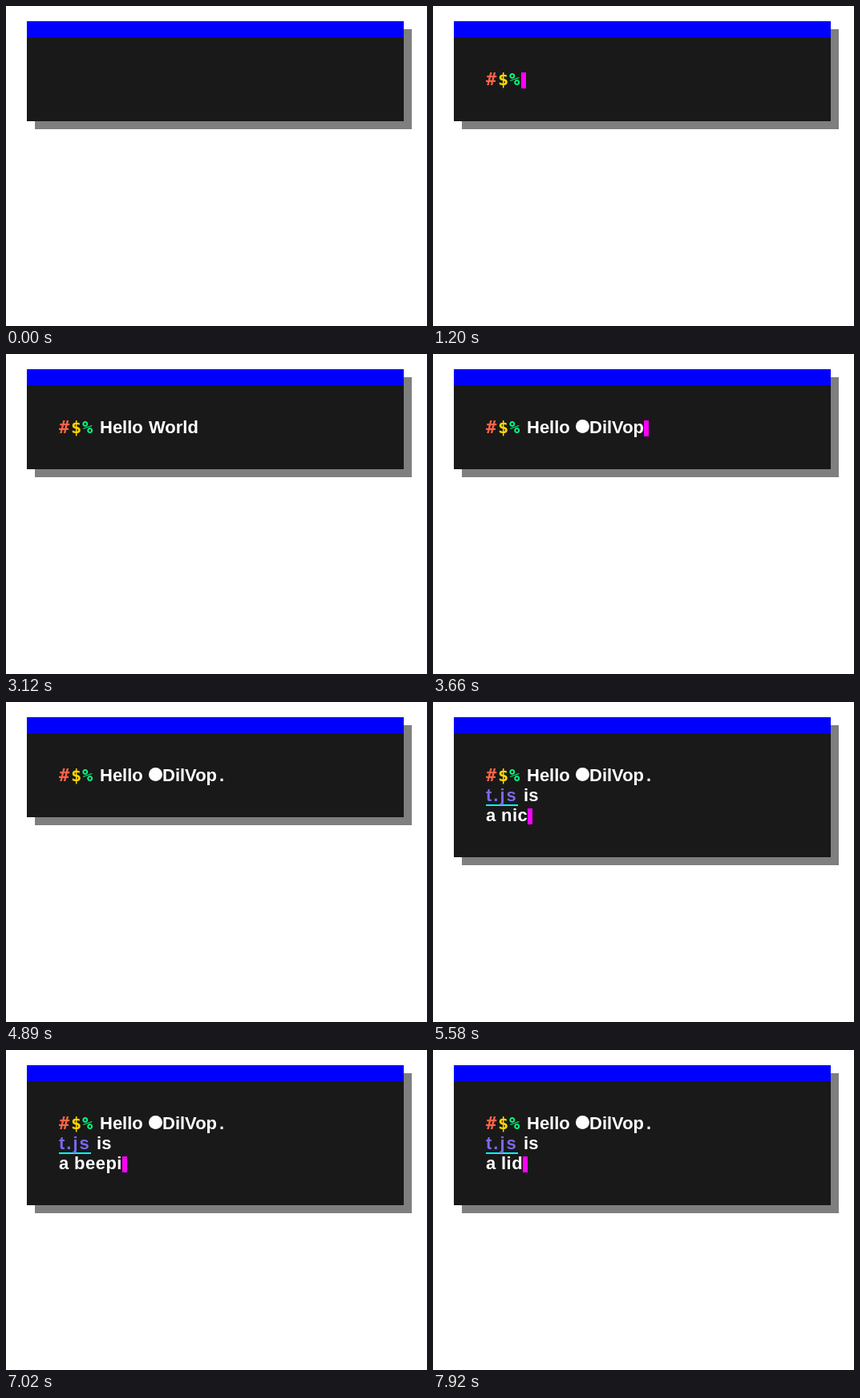
Recreate the animation shown at these times as an HTML page. Size 525x400 px, loop 8000 ms.

```html
<!DOCTYPE html>
<html lang="en">
<head>
<meta charset="utf-8">
<title>Terminal typing</title>
<style>
html, body { margin: 0; width: 100%; height: 100%; overflow: hidden; background: #fff; }
#win {
  position: absolute; left: 26px; top: 19px; width: 470px; height: 125px;
  background: #191919; box-shadow: 10px 10px 0 #7f7f7f;
}
#bar { height: 20px; background: #00f; }
.t {
  position: absolute; height: 24px; white-space: pre; color: #fff;
  font: bold 22px/25px "Liberation Sans", Arial, sans-serif;
}
.one { top: 79px; }
.two { top: 104px; }
.three { top: 129px; letter-spacing: .5px; }
.sign { font-family: "DejaVu Sans Mono", monospace; letter-spacing: 1.5px; }
#hash { left: 66px; color: #ff6347; }
#dollar { left: 81px; color: #ffd700; }
#percent { left: 95px; color: #00ff7f; }
#hello { left: 117px; }
#world { left: 178px; }
#name { left: 195px; }
#dot { left: 266px; }
#link { left: 66px; color: #7b68ee; letter-spacing: 2px; }
#link.on { border-bottom: 2px solid #0ff; }
#is { left: 107px; }
#lead { left: 66px; }
#word { left: 85px; }
#logo {
  position: absolute; left: 178px; top: 82px; width: 17px; height: 17px;
  border-radius: 50%; background: #fff;
}
#cursor { position: absolute; width: 6px; height: 20px; background: #f0f; }
</style>
</head>
<body>
<div id="win"><div id="bar"></div></div>
<span class="t one sign" id="hash"></span>
<span class="t one sign" id="dollar"></span>
<span class="t one sign" id="percent"></span>
<span class="t one" id="hello"></span>
<span class="t one" id="world"></span>
<span id="logo"></span>
<span class="t one" id="name"></span>
<span class="t one" id="dot"></span>
<span class="t two" id="link"></span>
<span class="t two" id="is"></span>
<span class="t three" id="lead"></span>
<span class="t three" id="word"></span>
<div id="cursor"></div>
<script>
const LOOP = 8000, KEY = 30, FAST = 360 / 14;
const $ = id => document.getElementById(id);
const texts = [...document.querySelectorAll('.t')];
const events = [];

const at = (time, change) => events.push({ time, change });
const put = (time, id, text) => at(time, s => {
  s.text[id] = text;
  s.active = id;
  s.cursor = true;
});

// Both return the time of the next keystroke.
function type(time, id, text, step = KEY) {
  for (let n = 1; n <= text.length; n++, time += step) put(time, id, text.slice(0, n));
  return time;
}
function erase(time, id, text, step = KEY) {
  for (let n = text.length - 1; n >= 0; n--, time += step) put(time, id, text.slice(0, n));
  return time;
}
const blink = (...times) => times.forEach(time => at(time, s => { s.cursor = !s.cursor; }));
function newline(time, id) {
  put(time, id, '');
  at(time, s => { s.rows++; });
  return time + FAST;
}

blink(30, 210, 360, 450, 600, 690, 840);
type(870, 'hash', '#');
type(900, 'dollar', '$');
type(930, 'percent', '%');
blink(1050, 1140, 1260, 1350, 1440, 1530, 1650, 1770, 1890, 2010, 2130, 2250, 2340);

put(2490, 'hello', '');
type(type(2520, 'hello', 'Hello '), 'world', 'World');
blink(2910, 3000, 3120, 3270);
erase(3300, 'world', 'World');

put(3480, 'name', '');
at(3480, s => { s.logo = true; });
type(type(3510, 'name', 'DilVop'), 'dot', '.');
blink(3780, 3870, 3930, 4020, 4110, 4200, 4320, 4410, 4500, 4590, 4680, 4800, 4890);

let next = newline(5040, 'link');
next = type(next, 'link', 't.js', FAST);
next = type(next, 'is', ' is', FAST);
next = newline(next, 'lead');
next = type(next, 'lead', 'a ', FAST);
type(next, 'word', 'nice', FAST);

type(erase(5580, 'word', 'nice'), 'word', 'friendly');
blink(6030, 6120, 6210, 6330);
erase(6450, 'word', 'friendly');
type(6900, 'word', 'beeping');
blink(7080);
erase(7290, 'word', 'beeping');
blink(7560, 7740);
type(7860, 'word', 'lid');

events.sort((a, b) => a.time - b.time);

function draw(time) {
  const s = { text: {}, active: 'hash', cursor: false, logo: false, rows: 0 };
  for (const e of events) {
    if (e.time > time + .5) break;
    e.change(s);
  }
  for (const el of texts) {
    const text = s.text[el.id] || '';
    if (el.textContent !== text) el.textContent = text;
  }
  $('link').classList.toggle('on', !!s.text.link);
  $('win').style.height = 125 + 25 * s.rows + 'px';
  $('logo').style.display = s.logo ? 'block' : 'none';

  const el = $(s.active), cursor = $('cursor').style;
  cursor.left = Math.round(el.getBoundingClientRect().right) + 'px';
  cursor.top = el.offsetTop + 4 + 'px';
  cursor.visibility = s.cursor ? 'visible' : 'hidden';
}

const start = performance.now();
function tick() {
  draw((performance.now() - start) % LOOP);
  requestAnimationFrame(tick);
}
draw(0);
requestAnimationFrame(tick);
</script>
</body>
</html>
```
